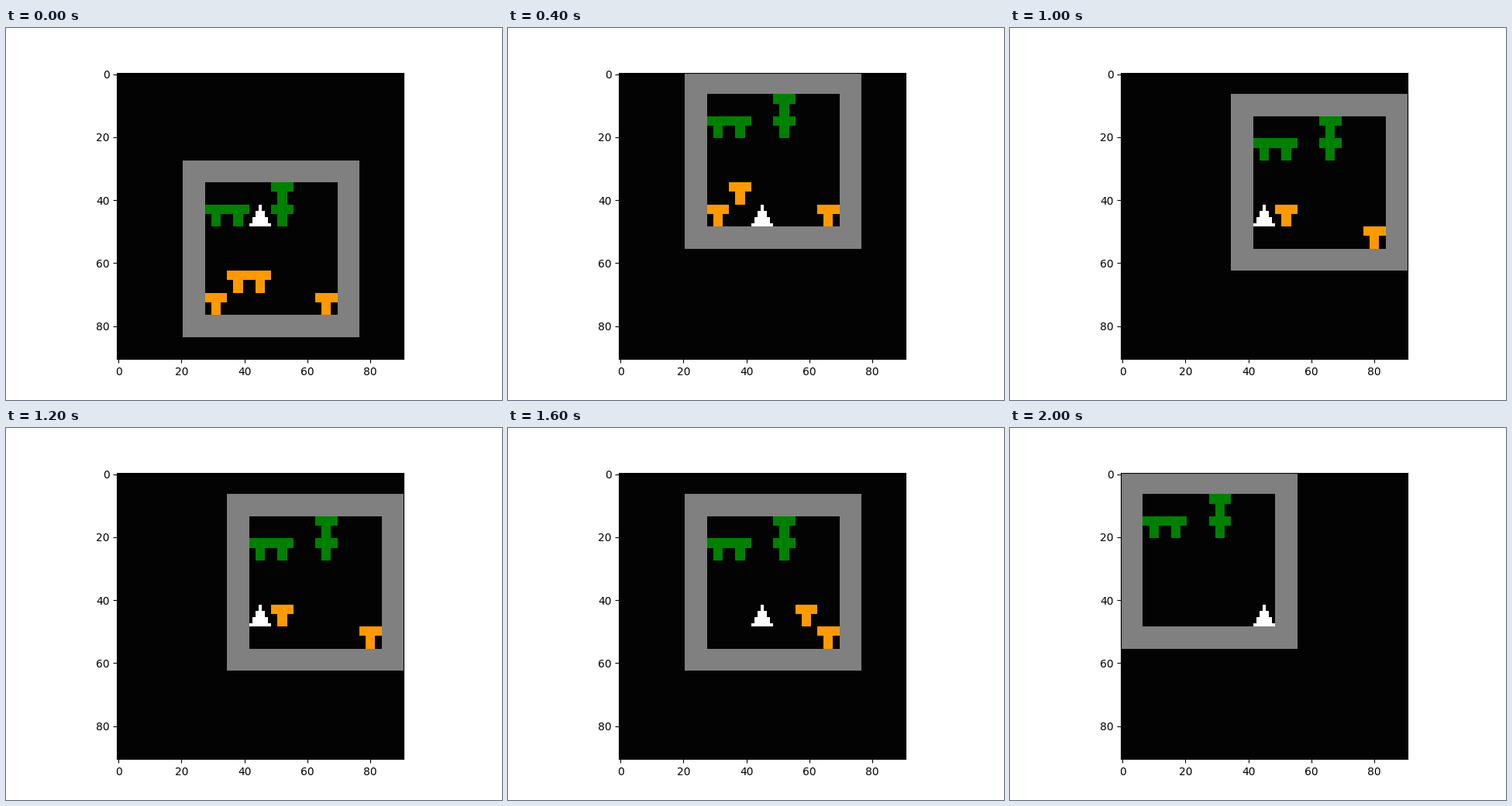
A matplotlib script for the animation above (2.1 s loop, 640 by 480 pixels).

```python
import numpy as np
import matplotlib.pyplot as plt
from matplotlib.animation import FuncAnimation

TILE, VIEW, ROOM, CENTER = 7, 13, 8, 6
VOID, WALL, GREEN, ORANGE, WHITE = (
    (3, 3, 3), (128, 128, 128), (0, 128, 0), (255, 153, 0), (255, 255, 255))

STEPS = {"U": (0, -1), "D": (0, 1), "L": (-1, 0), "R": (1, 0), ".": (0, 0)}
MOVES = "DDDD.L.L.UUDRRRLRRRD"
START = (3, 2)
PLANTS = [(1, 2), (2, 2), (4, 1), (4, 2)]
BLOCKS = {(2, 5), (3, 5), (1, 6), (6, 6)}

rows, cols = np.mgrid[:TILE, :TILE]
offset = abs(cols - TILE // 2)
TEE = (rows < 3) | (offset <= 1)
ARROW = offset <= rows // 2


def is_inside(cell):
    return all(0 < c < ROOM - 1 for c in cell)


def play():
    """Return (agent, blocks) per step; a block pushed into a wall vanishes."""
    agent, blocks = START, set(BLOCKS)
    states = [(agent, frozenset(blocks))]
    for move in MOVES:
        dx, dy = STEPS[move]
        agent = agent[0] + dx, agent[1] + dy
        if agent in blocks:
            blocks.remove(agent)
            pushed = agent[0] + dx, agent[1] + dy
            if is_inside(pushed):
                blocks.add(pushed)
        states.append((agent, frozenset(blocks)))
    return states


def stamp(image, cell, mask, color):
    x, y = cell[0] * TILE, cell[1] * TILE
    image[y:y + TILE, x:x + TILE][mask] = color


def render(agent, blocks):
    """Draw the room so that the agent stays in the middle of the view."""
    room = np.full((ROOM * TILE, ROOM * TILE, 3), WALL, np.uint8)
    room[TILE:-TILE, TILE:-TILE] = VOID
    for cell in PLANTS:
        stamp(room, cell, TEE, GREEN)
    for cell in blocks:
        stamp(room, cell, TEE, ORANGE)
    stamp(room, agent, ARROW, WHITE)

    view = np.full((VIEW * TILE, VIEW * TILE, 3), VOID, np.uint8)
    left, top = ((CENTER - c) * TILE for c in agent)
    view[top:top + ROOM * TILE, left:left + ROOM * TILE] = room
    return view


states = play()
fig, ax = plt.subplots(figsize=(6.4, 4.8), dpi=100)
picture = ax.imshow(render(*states[0]))


def update(i):
    picture.set_data(render(*states[i]))
    return [picture]


anim = FuncAnimation(fig, update, frames=len(states), interval=100, repeat=True)
plt.show()
```
